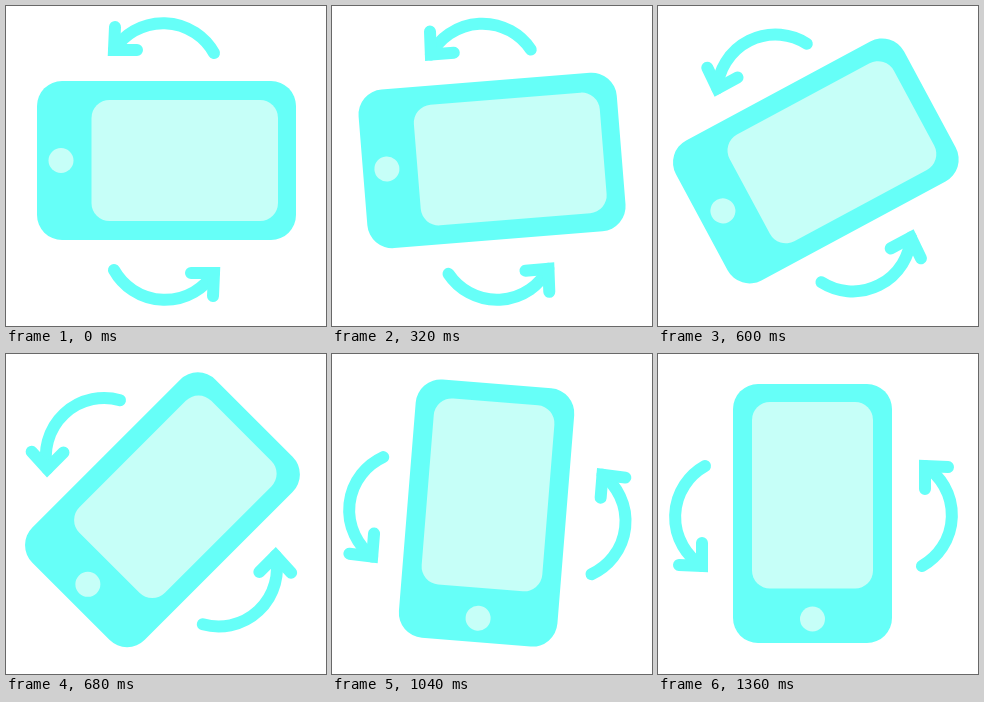
Write an HTML page that moves like this. It is 320 px wide and 320 px high and loops after 2000 ms.

```html
<!DOCTYPE html>
<html lang="en">
<head>
<meta charset="utf-8">
<title>Rotate phone</title>
<style>
  html, body { margin: 0; width: 100%; height: 100%; overflow: hidden; background: #fff; }
  svg { display: block; width: 100%; height: 100%; }
</style>
</head>
<body>
<svg viewBox="0 0 320 320">
  <defs>
    <g id="arrow" fill="none" stroke="#66fff8" stroke-width="12" stroke-linecap="round">
      <path d="M208 47A58.3 58.3 0 0 0 108 44"/>
      <path d="M109 21L108 44L131 44"/>
    </g>
  </defs>
  <g id="scene">
    <rect x="31" y="75" width="259" height="159" rx="25" fill="#66fff8"/>
    <rect x="85.5" y="94" width="186.5" height="121" rx="18" fill="#c6fff8"/>
    <circle cx="55" cy="154.5" r="12.5" fill="#c6fff8"/>
    <use href="#arrow"/>
    <use href="#arrow" transform="rotate(180 158 155.5)"/>
  </g>
</svg>
<script>
  const LOOP = 2000, TURN = 1360, STEP = 40, EASE = 0.715;
  const scene = document.getElementById('scene');

  const bezier = (s, a, b) => 3 * s * (1 - s) ** 2 * a + 3 * s * s * (1 - s) * b + s ** 3;

  // cubic-bezier(EASE, 0, 1 - EASE, 1), solved by bisection
  function ease(x) {
    if (x <= 0 || x >= 1) return x <= 0 ? 0 : 1;
    let low = 0, high = 1;
    for (let i = 0; i < 30; i++) {
      const mid = (low + high) / 2;
      if (bezier(mid, EASE, 1 - EASE) < x) low = mid; else high = mid;
    }
    return bezier(low, 0, 1);
  }

  function draw() {
    const time = Math.floor(performance.now() % LOOP / STEP) * STEP;
    scene.setAttribute('transform', `rotate(${-90 * ease(time / TURN)} 160 160)`);
    requestAnimationFrame(draw);
  }
  draw();
</script>
</body>
</html>
```
